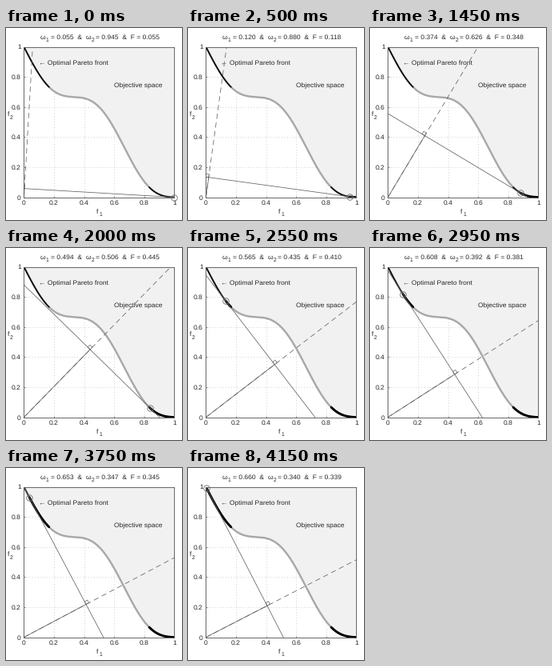
Write a matplotlib script that moves like this. It is 220x240 px and loops after 4.2 s.

```python
import math

import numpy as np
import matplotlib.pyplot as plt
from matplotlib.animation import FuncAnimation

W, H, DPI = 220, 240, 100
PX = 72 / DPI                      # one pixel in points
FRAMES, STEP = 84, 0.004
X0, Y0, SIDE = 22.4, 211.6, 188    # plot origin and side in pixels
INK, LINE, FRAME = "0.15", "0.4", "0.35"

plt.rcParams.update({
    "font.family": "Liberation Sans",
    "font.size": 8.5 * PX,
    "text.color": INK,
    "text.hinting": "none",
    "lines.scale_dashes": False,
})


def front(x):
    return 1 - x - 0.1 * np.sin(3 * np.pi * x)


def slope(x):
    return 1 + 0.3 * np.pi * np.cos(3 * np.pi * x)


def cut(v):
    """Truncate to three decimals."""
    return math.floor(1000 * v + 0.02) / 1000


fig = plt.figure(figsize=(W / DPI, H / DPI), dpi=DPI, facecolor="white")
ax = fig.add_axes([X0 / W, 1 - Y0 / H, SIDE / W, SIDE / H])
ax.set(xlim=(0, 1), ylim=(0, 1))

ticks = np.linspace(0, 1, 6)
names = [f"{t:.1g}" for t in ticks]
ax.set_xticks(ticks, names)
ax.set_yticks(ticks, names)
ax.tick_params(direction="in", length=2 * PX, width=0.7 * PX, pad=3.5 * PX,
               color=FRAME, labelcolor=INK, top=True, right=True)
ax.set_axisbelow(True)
ax.grid(color="0.75", lw=0.7 * PX, ls=(0, (1 * PX, 2.5 * PX)))
for spine in ax.spines.values():
    spine.set(linewidth=0.9 * PX, edgecolor=FRAME, zorder=4)


def label(x, y, s="", va="baseline", **kw):
    return fig.text(x / W, 1 - y / H, s, va=va, **kw)


def symbol(x, y, base, sub, dx):
    label(x, y, base)
    label(x + dx, y + 3.5, sub, size=6.8 * PX)


def stroke(x=(), y=(), width=0.8, color=LINE, z=3, **kw):
    return ax.plot(x, y, color=color, lw=width * PX, zorder=z, **kw)[0]


xs = np.linspace(0, 1, 301)
ax.fill_between(xs, front(xs), 1, color="0.945", lw=0, zorder=1.5)
stroke(xs, front(xs), 2.4, "0.66", 2)
for lo, hi in ((0, 1 / 6), (5 / 6, 1)):
    part = np.linspace(lo, hi, 60)
    stroke(part, front(part), 1.6, "black", 2.1)

label(41, 44, "← Optimal Pareto front", va="center")
label(135, 72, "Objective space", va="center")
symbol(113, 231.5, "f", "1", 3)
symbol(1.5, 110.5, "f", "2", 3)

TOP = 13.5
symbol(43, TOP, "ω", "1", 6.8)
symbol(99.5, TOP, "ω", "2", 6.8)
first = label(55.8, TOP)
second = label(112.3, TOP)

trails = [stroke(width=2.9, color="black", z=2.2, solid_capstyle="round")
          for _ in range(2)]
ray = stroke(dashes=(6.5 * PX, 4.5 * PX))
arm = stroke()
level = stroke()
corner = stroke(width=0.7)
ring = stroke(z=5, marker="o", ms=7.5 * PX, mfc="none", mew=0.8 * PX,
              clip_on=False)


def trace(line, a, b):
    x = np.linspace(a, b, 60)
    line.set_data(x, front(x))


def update(k):
    half = FRAMES // 2
    if k < half:
        x = 1 - min(STEP * (k + 1), 1 / 6)
        trace(trails[0], x, 1 - STEP)
        trails[1].set_data([], [])
    else:
        x = min(STEP * (FRAMES - k), 1 / 6)
        trace(trails[0], 5 / 6, 1 - STEP)
        trace(trails[1], x, 1 / 6)

    y, m = front(x), slope(x)
    w = np.array([m, 1]) / (1 + m)
    f = w @ (x, y)
    foot = w * f / (w @ w)
    end = w / w.max()

    ray.set_data([0, end[0]], [0, end[1]])
    arm.set_data([0, foot[0]], [0, foot[1]])
    level.set_data([0, 1], [f / w[1], (f - w[0]) / w[1]])
    ring.set_data([x], [y])

    # right-angle mark, 4 px a side
    u = w / np.hypot(*w) * 4 / SIDE
    v = np.array([-u[1], u[0]])
    mark = np.array([foot, foot + u, foot + u + v, foot + v, foot])
    corner.set_data(mark[:, 0], mark[:, 1])

    w1 = cut(w[0])
    first.set_text(f"= {w1:.3f}  &")
    second.set_text(f"= {1 - w1:.3f}  &  F = {cut(f):.3f}")
    return [*trails, ray, arm, level, ring, corner, first, second]


anim = FuncAnimation(fig, update, frames=FRAMES, interval=50, repeat=True,
                     repeat_delay=0, blit=False)
plt.show()
```
